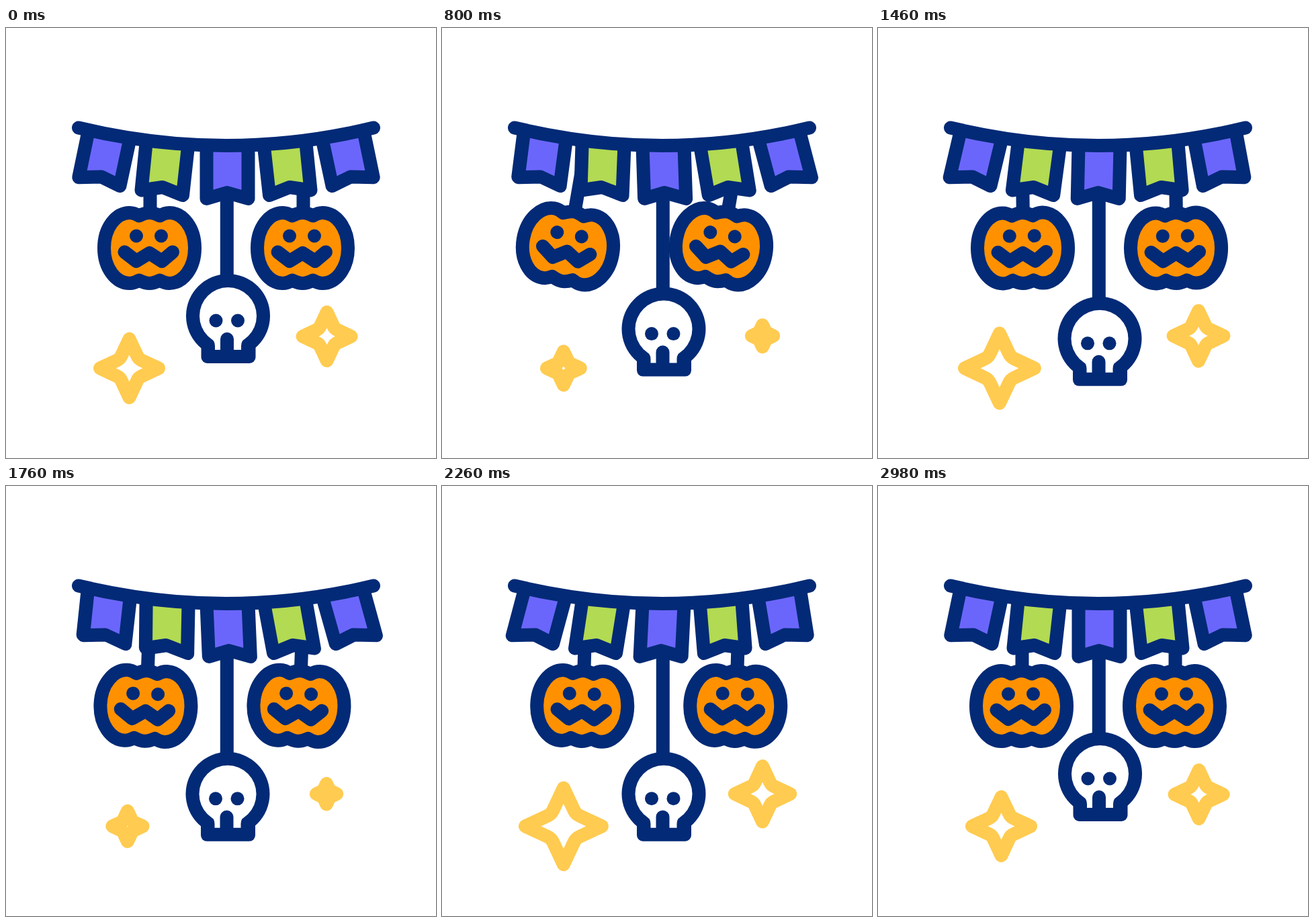
An HTML page that plays this animation: 640 by 640 pixels, repeating every 3 s.

```html
<!DOCTYPE html>
<html lang="en">
<head>
<meta charset="utf-8">
<title>Halloween garland</title>
<style>
  html, body { margin: 0; width: 100%; height: 100%; overflow: hidden; background: #fff; }
  svg { display: block; width: 100vw; height: 100vh; }
  .line { stroke: #032a76; stroke-width: 20; stroke-linecap: round; stroke-linejoin: round; fill: none; }
  .dark { fill: #032a76; }
  .pumpkin { fill: #ff9100; }
  .flag .line, .cloth { fill: inherit; }
  .purple { fill: #6b66fb; }
  .green { fill: #b2da53; }
  .star { fill: none; stroke: #ffcb50; stroke-width: 20; stroke-linejoin: round; }
</style>
</head>
<body>
<svg viewBox="0 0 640 640">
  <defs>
    <g id="lantern">
      <path class="line" d="M214.500 178V270"/>
      <path class="line pumpkin" d="M146 327.500C146 297 164 275 184 275C190 275 194 277 198 279.500
        C203 277 208 275 213.500 275C219 275 224 277 229 279.500C233 277 237 275 243 275
        C263 275 281 297 281 327.500C281 358 263 380 243 380C237 380 233 378 229 375.500
        C224 378 219 380 213.500 380C208 380 203 378 198 375.500C194 378 190 380 184 380
        C164 380 146 358 146 327.500Z"/>
      <circle class="dark" cx="194" cy="309.500" r="10"/>
      <circle class="dark" cx="231" cy="309.500" r="10"/>
      <path class="line" d="M176.500 333.500L194 347L213.500 335L232 347L248 333.500"/>
    </g>
    <!-- Flags are open at the top, where the rope covers their ends. -->
    <path id="sideFlag" class="line cloth" d="M122.500 154L108.300 222.300L142 221.500L169.500 235L184.500 165"/>
    <path id="midFlag" class="line cloth" d="M208.800 169L201.500 241.500L233 237L263 249L271.300 174"/>
  </defs>

  <g id="lanternL"><use href="#lantern"/></g>
  <g id="lanternR"><use href="#lantern" x="228"/></g>

  <path id="cord" class="line"/>
  <g id="skull">
    <circle class="dark" cx="330.500" cy="428.500" r="62.500"/>
    <rect class="dark" x="290.500" y="466" width="81" height="33" rx="9"/>
    <circle cx="330.500" cy="428.500" r="42.500" fill="#fff"/>
    <path fill="#fff" d="M303 460Q311 465 311 473V479H350V473Q350 465 358 460Z"/>
    <path class="dark" d="M319 484V463a10 10 0 0 1 20 0V484Z"/>
    <circle class="dark" cx="312.500" cy="435.500" r="10"/>
    <circle class="dark" cx="345" cy="435.500" r="10"/>
  </g>

  <g class="flag purple"><use href="#sideFlag"/></g>
  <g class="flag green"><use href="#midFlag"/></g>
  <g class="flag purple"><path class="line" d="M298.500 176V254L329 245L360.500 254V176"/></g>
  <g class="flag green"><use href="#midFlag" transform="matrix(-1 0 0 1 655 0)"/></g>
  <g class="flag purple"><use href="#sideFlag" transform="matrix(-1 0 0 1 655 0)"/></g>
  <path class="line" d="M108 148.500Q327.500 201.500 547 148.500"/>

  <path id="starL" class="star"/>
  <path id="starR" class="star"/>
</svg>
<script>
const LOOP = 3000, STEP = 20;
const el = id => document.getElementById(id);
const ease = s => s * s * (3 - 2 * s);

// Eased value at time t from matching lists of times and values.
function track(times, values, t) {
  if (t <= times[0]) return values[0];
  for (let i = 1; i < times.length; i++) {
    if (t < times[i]) {
      const s = (t - times[i - 1]) / (times[i] - times[i - 1]);
      return values[i - 1] + (values[i] - values[i - 1]) * ease(s);
    }
  }
  return values[values.length - 1];
}

const every = (start, gap, count) => Array.from({ length: count }, (_, i) => start + gap * i);

const flagTimes = every(100, 400, 7);
const flagWave = [0, 1, -1, 1, -1, 1, 0];
// hinge height, slant to the left, slant to the right (degrees)
const flagSlant = [
  [160, 5, 6.7],
  [171, 4.4, 5.9],
  [176, 4.4, 2.8],
  [171, 2.4, 5],
  [160, 4.3, 4.4]
];
const flags = [...document.querySelectorAll('.flag')];

const hangTimes = every(100, 382.8, 8);
const lanternAngles = [0, -11, 11.6, -8.4, 4.8, -5.5, 4.8, 0];
const skullDrops = [0, 50, 17, 46, 25, 43.5, 24, 0];

const starTimes = [100, 360, 860, 1330, 1820, 2320, 2810, 2980];
const starSizesL = [43.5, 58.4, 23.5, 58.4, 21, 58.4, 22, 43.5];
const starSizesR = [36, 42.3, 15, 42.3, 14, 42.3, 14.4, 36];
const driftTimes = [100, 340, 2810, 2980];

// Four points with softly rounded inner corners.
function starPath(cx, cy, tip) {
  const inner = tip * 0.32, k = 0.86;
  const near = inner * k, far = tip + (inner - tip) * k;
  let d = '';
  for (let i = 0; i < 4; i++) {
    const c = [1, 0, -1, 0][i], s = [0, 1, 0, -1][i];
    const at = (x, y) => (cx + x * c - y * s).toFixed(2) + ' ' + (cy + x * s + y * c).toFixed(2);
    d += (i ? 'L' : 'M') + at(0, -tip) + 'L' + at(near, -far) +
      'Q' + at(inner, -inner) + ' ' + at(far, -near);
  }
  return d + 'Z';
}

function draw(t) {
  const wave = track(flagTimes, flagWave, t);
  flags.forEach((flag, i) => {
    const [y, left, right] = flagSlant[i];
    const slant = wave * (wave > 0 ? left : right);
    flag.setAttribute('transform', `translate(0 ${y}) skewX(${-slant}) translate(0 ${-y})`);
  });

  const angle = track(hangTimes, lanternAngles, t);
  el('lanternL').setAttribute('transform', `rotate(${angle} 214 175)`);
  el('lanternR').setAttribute('transform', `rotate(${angle} 442 175)`);

  const drift = track(driftTimes, [0, 1, 1, 0], t);
  const drop = track(hangTimes, skullDrops, t);
  el('skull').setAttribute('transform', `translate(${-0.5 * drift} ${drop})`);
  el('cord').setAttribute('d', `M328.8 180V${376 + drop}`);

  el('starL').setAttribute('d', starPath(183.5 - 2.6 * drift, 506.4, track(starTimes, starSizesL, t)));
  el('starR').setAttribute('d', starPath(477.6 - 0.6 * drift, 459 - 0.7 * drift, track(starTimes, starSizesR, t)));
}

const start = performance.now();
function frame() {
  const t = (performance.now() - start) % LOOP;
  draw(Math.floor(t / STEP) * STEP);
  requestAnimationFrame(frame);
}
frame();
</script>
</body>
</html>
```
